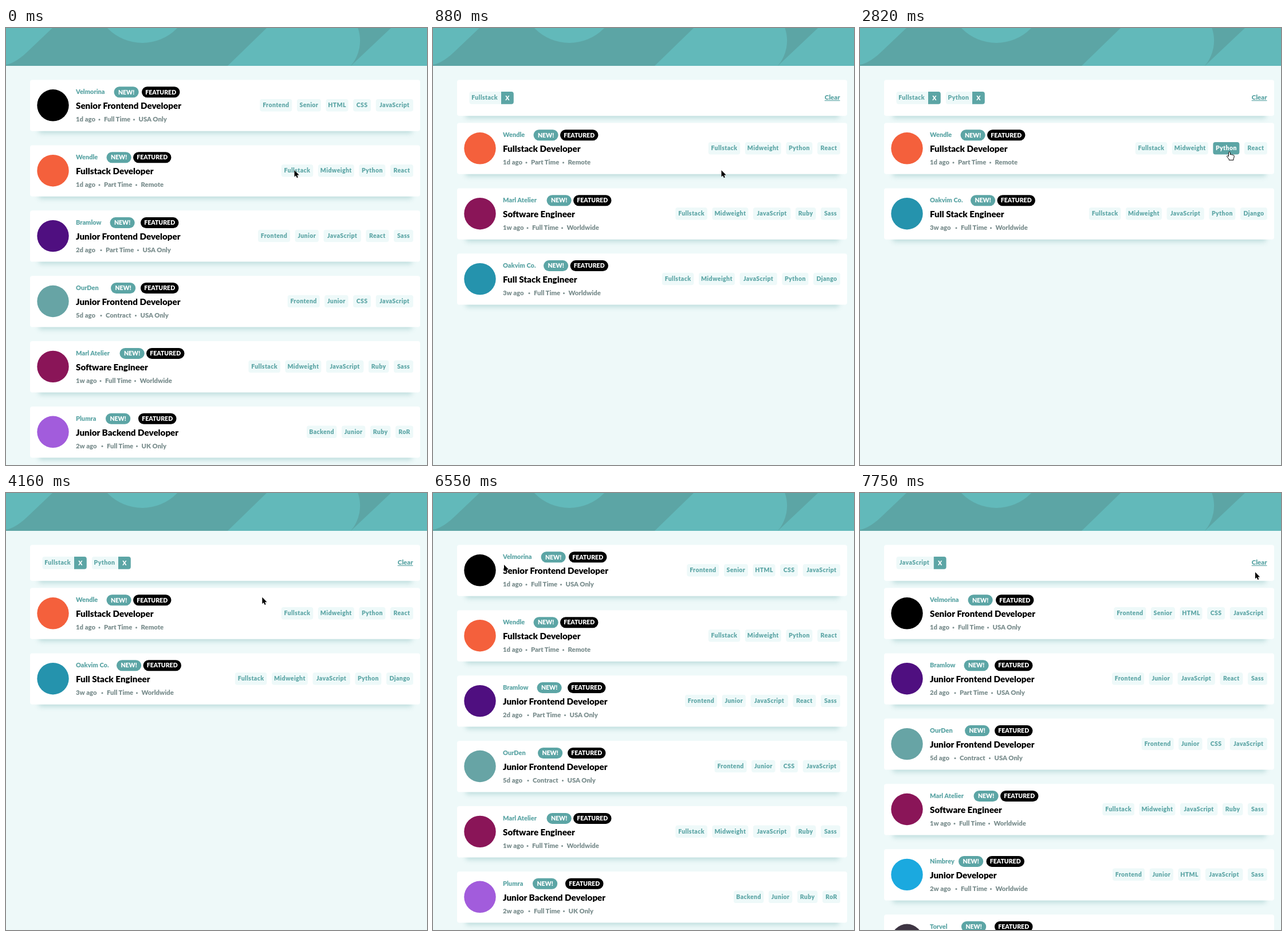
These frames come from a looping animation (735 by 762 pixels, 8000 ms). An HTML page:

```html
<!DOCTYPE html>
<html lang="en">
<head>
<meta charset="utf-8">
<title>Job listings</title>
<style>
  html, body { margin: 0; width: 100%; height: 100%; overflow: hidden; background: #eef9f9; }
  svg { display: block; overflow: hidden; }
  text { font-family: Lato, "Open Sans", sans-serif; font-weight: 900; }
  .name { font-size: 11px; fill: #5ca5a5; }
  .pill { font-size: 10.5px; fill: #fff; text-anchor: middle; }
  .title { font-size: 15.2px; fill: #000; }
  .meta { font-size: 11.3px; fill: #7b8e8e; }
  .tag { font-size: 10.5px; letter-spacing: .4px; text-anchor: middle; }
  .clear { font-size: 11.4px; fill: #5ca5a5; text-anchor: end; text-decoration: underline; }
  .shadow { filter: blur(4px); fill: #5ca5a5; opacity: .33; }
</style>
</head>
<body>
<svg width="735" height="762" viewBox="0 0 735 762">
  <rect width="735" height="66" fill="#5ca5a5"/>
  <g fill="#62b9ba">
    <path d="M0 0H81L42 37Q18 61 0 64Z"/>
    <circle cx="238" cy="-58.6" r="84.6"/>
    <path d="M455 0H614.4A68 68 0 0 1 602 66H387Z"/>
    <path d="M672 0H735V66H602Z"/>
  </g>
  <rect y="66" width="735" height="696" fill="#eef9f9"/>
  <g id="page"></g>
</svg>
<script>
const TEAL = '#5ca5a5', PALE = '#eef9f9', DARK = '#2b3939';
const LOOP = 8000, STEP = 148, GAP = 8.6, PITCH = 113.9;

const tagWidth = {
  Frontend: 56, Senior: 42, HTML: 39, CSS: 31, JavaScript: 65.3, Fullstack: 55.5, Midweight: 63,
  Python: 46, React: 40, Junior: 41.3, Sass: 34, Ruby: 35.5, Backend: 52.5, RoR: 31, Django: 47
};

// name, colour, x of both badges, title, details, x of the 2nd and 3rd detail, tags
const jobs = [
  ['Velmorina', '#000', 188.5, 237, 'Senior Frontend Developer', '1d ago,Full Time,USA Only', 171, 231.5, 'Frontend Senior HTML CSS JavaScript'],
  ['Wendle', '#f4603c', 175.5, 222, 'Fullstack Developer', '1d ago,Part Time,Remote', 171, 235.5, 'Fullstack Midweight Python React'],
  ['Bramlow', '#4f0f80', 181.5, 235, 'Junior Frontend Developer', '2d ago,Part Time,USA Only', 174, 238.5, 'Frontend Junior JavaScript React Sass'],
  ['OurDen', '#67a4a5', 183, 235, 'Junior Frontend Developer', '5d ago,Contract,USA Only', 174, 234.5, 'Frontend Junior CSS JavaScript'],
  ['Marl Atelier', '#8a1558', 198.5, 245, 'Software Engineer', '1w ago,Full Time,Worldwide', 173, 233.5, 'Fullstack Midweight JavaScript Ruby Sass'],
  ['Plumra', '#a25cdc', 174, 231, 'Junior Backend Developer', '2w ago,Full Time,UK Only', 176, 236.5, 'Backend Junior Ruby RoR'],
  ['Nimbrey', '#1ba9df', 172, 220.5, 'Junior Developer', '2w ago,Full Time,Worldwide', 176, 236.5, 'Frontend Junior HTML JavaScript Sass'],
  ['Torvel', '#3e3543', 177, 235, 'Junior Frontend Developer', '2w ago,Full Time,USA Only', 176, 236.5, 'Frontend Junior JavaScript Sass'],
  ['Oakvim Co.', '#2593ad', 193, 239.5, 'Full Stack Engineer', '3w ago,Full Time,Worldwide', 176, 236.5, 'Fullstack Midweight JavaScript Python Django']
];

const filters = [
  [0, []], [740, ['Fullstack']], [2820, ['Fullstack', 'Python']],
  [5350, ['Python']], [6550, []], [7750, ['JavaScript']]
];

// start, steps, end point
const moves = [
  [1630, 8, 645.5, 216], [3860, 7, 142, 129], [4905, 2, 123, 125.5],
  [6550, 1, 124, 125], [6850, 5, 690, 138]
];

const ARROW = 'M0 0V11.6L2.6 9.2 4.4 13.2 6.3 12.4 4.6 8.4H8.2Z';
const HAND = 'M-2 1.2C-2-.4.8-.4.8 1.2V5c.4-1 2.3-.8 2.5.3.5-.8 2.2-.5 2.4.6.6-.6 2 0 2 1.2' +
  ' 0 3-.6 3.4-1.2 5v2.2H-1.3v-1.6L-4.8 8.4c-.8-1.3.8-2.4 1.8-1.3l1 1z';

const rect = (x, y, w, h, r, fill) =>
  `<rect x="${x}" y="${y}" width="${w}" height="${h}" rx="${r}" fill="${fill}"/>`;
const text = (cls, x, y, s, fill) =>
  `<text class="${cls}" x="${x}" y="${y}"${fill ? ` style="fill:${fill}"` : ''}>${s}</text>`;

let mouse, hand;

function hovers(x, y, w, h) {
  const hit = mouse.live && mouse.x >= x && mouse.x < x + w && mouse.y >= y && mouse.y < y + h;
  hand = hand || hit;
  return hit;
}

const panel = (y, h) =>
  `<rect class="shadow" x="57" y="${y + 20}" width="652" height="${h - 16}" rx="4"/>` +
  rect(42, y, 681, h, 4, '#fff');

function tag(name, x, y) {
  const w = tagWidth[name], on = hovers(x, y, w, 21.5);
  return rect(x, y, w, 21.5, 4, on ? TEAL : PALE) +
    text('tag', x + w / 2, y + 14.4, name, on ? '#fff' : TEAL);
}

function card([name, color, newX, featX, title, details, x2, x3, tags], y) {
  let out = panel(y, 89.3) +
    `<circle cx="82" cy="${y + 44.3}" r="27.7" fill="${color}"/>` +
    text('name', 122, y + 24.7, name) +
    rect(newX, y + 11.8, 43.2, 19, 9.5, TEAL) + text('pill', newX + 21.6, y + 25, 'NEW!') +
    rect(featX, y + 11.8, 66.5, 19, 9.5, '#000') + text('pill', featX + 33.2, y + 25, 'FEATURED') +
    text('title', 122, y + 50.7, title);
  details.split(',').forEach((s, i) => {
    const x = [122, x2, x3][i];
    out += text('meta', x, y + 72.5, s);
    if (i) out += `<circle cx="${x - 8}" cy="${y + 69.3}" r="1.5" fill="#7b8e8e"/>`;
  });
  let x = 711 + GAP;
  for (const t of tags.split(' ').reverse()) {
    x -= tagWidth[t] + GAP;
    out += tag(t, x, y + 33.5);
  }
  return out;
}

function filterBar(active) {
  let out = panel(90.5, 62.8) + text('clear', 710.5, 125, 'Clear'), x = 63.5;
  for (const name of active) {
    const w = tagWidth[name], end = x + w;
    const fill = hovers(end, 111, 21.8, 21.8) ? DARK : TEAL;
    out += rect(x, 111, w + 4, 21.8, 4, PALE) + text('tag', x + w / 2 - 1, 125.2, name, TEAL) +
      `<path d="M${end} 111h17.8q4 0 4 4v13.8q0 4 -4 4h-17.8z" fill="${fill}"/>` +
      text('pill', end + 10.9, 125.6, 'X');
    x = end + 31;
  }
  return out;
}

function pointer(t) {
  let x = 503.5, y = 248;
  for (const [start, steps, toX, toY] of moves) {
    if (t < start) break;
    const p = Math.min(1, (Math.floor((t - start) / STEP) + 1) / steps);
    const e = p * p * (3 - 2 * p);
    x += (toX - x) * e;
    y += (toY - y) * e;
  }
  return { x, y, live: t >= 290 };
}

function cursor() {
  const look = hand
    ? `d="${HAND}" fill="#fff" stroke="#000"`
    : `d="${ARROW}" fill="#000" stroke="#fff" paint-order="stroke"`;
  return `<path ${look} stroke-linejoin="round" transform="translate(${mouse.x} ${mouse.y})"/>`;
}

function scene(t) {
  mouse = pointer(t);
  hand = false;
  const active = filters.filter(f => f[0] <= t).pop()[1];
  const top = active.length ? 165.5 : 90.5;
  let out = active.length ? filterBar(active) : '';
  jobs.filter(j => active.every(f => j[8].split(' ').includes(f)))
    .forEach((j, i) => out += card(j, top + i * PITCH));
  return out + cursor();
}

const page = document.getElementById('page');
let shown;
function draw(now) {
  const next = scene(now % LOOP);
  if (next !== shown) page.innerHTML = shown = next;
  requestAnimationFrame(draw);
}
draw(performance.now());
</script>
</body>
</html>
```
